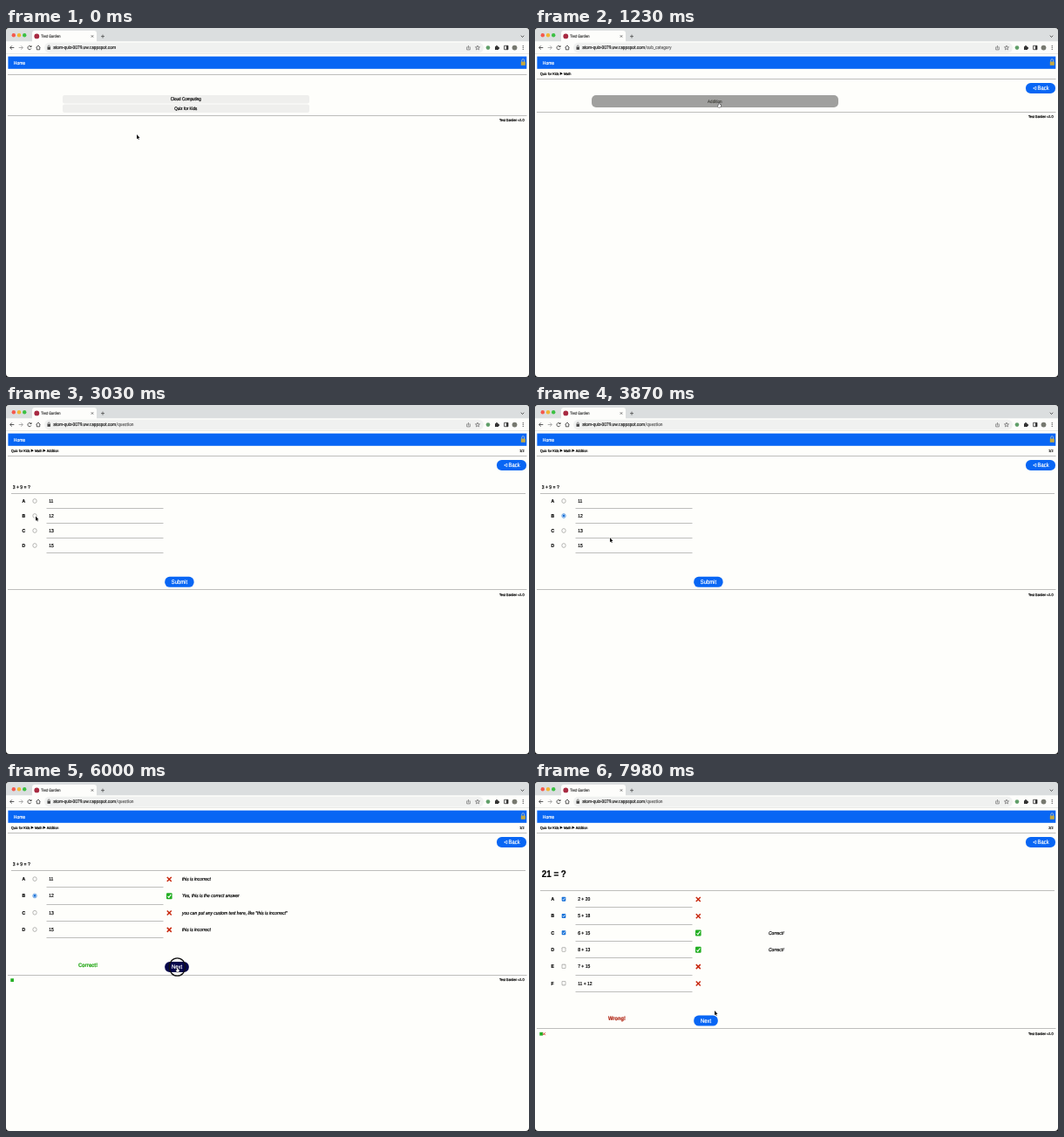
These frames come from a looping animation (600x400 px, 8 s). An HTML page with a canvas:

```html
<!DOCTYPE html>
<html lang="en">
<head>
<meta charset="utf-8">
<title>Quiz walkthrough</title>
<style>
html, body { margin: 0; width: 100%; height: 100%; overflow: hidden; background: #fefefb; }
canvas { display: block; width: 600px; height: 400px; }
</style>
</head>
<body>
<canvas id="stage" width="600" height="400"></canvas>
<script>
const ctx = document.getElementById('stage').getContext('2d');
const LOOP = 8000;
const ASPECT = 1.13;
const SANS = '"Liberation Sans", Arial, sans-serif';
const UI = 'Roboto, sans-serif';
const APP = 'Test Garden';
const PAPER = '#fefefb', BLUE = '#0866f4', PRESSED = '#06064c', RULE = '#bebebc';
const RED = '#c92a10', GREEN = '#22ae22', INK = '#000';

const PAGES = [
  [0, 'home'], [520, 'category'], [950, 'subcategory'], [1480, 'group'],
  [2300, 'first'], [4900, 'firstResult'], [6120, 'second'], [7800, 'secondResult']
];
const PATHS = { home: '', category: '/main_category', subcategory: '/sub_category', group: '/group' };

// time, x, y of the pointer tip
const TRACK = [
  [60, 150, 122], [340, 206, 92], [520, 206, 92], [660, 213, 86], [1000, 213, 86],
  [1200, 211, 85], [1520, 211, 85], [1900, 228, 113.5], [2350, 228, 113.5],
  [2950, 34, 127.5], [3500, 34, 127.5], [4450, 187.5, 200], [5000, 187.5, 200],
  [5600, 196.5, 212], [6140, 196.5, 212], [6440, 33, 133], [6570, 33, 133],
  [6690, 33, 150], [6810, 33, 150], [6930, 33, 167], [7070, 33, 167], [7550, 206, 262]
];
const CLICKS = [
  [390, 490], [800, 910], [1310, 1420], [2110, 2220], [3250, 3350], [4690, 4830],
  [5930, 6070], [6470, 6560], [6710, 6800], [6960, 7050], [7640, 7750]
];

const FIRST = {
  title: '3 + 9 = ?', size: 5.05, titleY: 94, top: 101.5, count: '1/2',
  options: ['11', '12', '13', '15'], right: [1],
  notes: ['this is incorrect', 'Yes, this is the correct answer',
    'you can put any custom text here, like "this is incorrect"', 'this is incorrect'],
  noteX: 202, picks: [[3340, 1]], verdict: 'Correct!'
};
const SECOND = {
  title: '21 = ?', size: 9.8, bold: true, titleY: 105, top: 124.5, count: '2/2', multi: true,
  options: ['2 + 20', '5 + 18', '6 + 15', '8 + 13', '7 + 15', '11 + 12'], right: [2, 3],
  notes: ['', '', 'Correct!', 'Correct!'],
  noteX: 268, picks: [[6550, 0], [6790, 1], [7040, 2]], verdict: 'Wrong!'
};

function text(s, x, y, size, { color = INK, style = '', align = 'left', font = SANS } = {}) {
  ctx.save();
  ctx.translate(x, y + size * 0.39);
  ctx.scale(1, ASPECT);
  ctx.font = `${style} ${size}px ${font}`;
  ctx.textRendering = 'geometricPrecision';
  ctx.textAlign = align;
  ctx.fillStyle = ctx.strokeStyle = color;
  ctx.lineWidth = 0.18; // tiny text needs a little extra weight
  ctx.fillText(s, 0, 0);
  ctx.strokeText(s, 0, 0);
  const width = ctx.measureText(s).width;
  ctx.restore();
  return width;
}

function rect(x, y, w, h, color) {
  ctx.fillStyle = color;
  ctx.fillRect(x, y, w, h);
}

function pill(x, y, w, h, r, color) {
  ctx.beginPath();
  ctx.roundRect(x, y, w, h, r);
  ctx.fillStyle = color;
  ctx.fill();
}

function disc(x, y, r, color) {
  ctx.beginPath();
  ctx.arc(x, y, r, 0, 7);
  ctx.fillStyle = color;
  ctx.fill();
}

function ring(x, y, rx, ry, color, width) {
  ctx.beginPath();
  ctx.ellipse(x, y, rx, ry, 0, 0, 7);
  ctx.strokeStyle = color;
  ctx.lineWidth = width;
  ctx.stroke();
}

function path(points, { x = 0, y = 0, fill, stroke, width = 0.8, close = false }) {
  ctx.beginPath();
  for (let i = 0; i < points.length; i += 2) ctx.lineTo(x + points[i], y + points[i + 1]);
  if (close) ctx.closePath();
  ctx.lineJoin = 'round';
  if (stroke) {
    ctx.strokeStyle = stroke;
    ctx.lineWidth = width;
    ctx.stroke();
  }
  if (fill) {
    ctx.fillStyle = fill;
    ctx.fill();
  }
}

function rule(y, x0 = 2, x1 = 597.5) {
  rect(x0, Math.floor(y), x1 - x0, 1, RULE);
}

function cross(x, y, r, width) {
  path([-r, -r, r, r], { x, y, stroke: RED, width });
  path([r, -r, -r, r], { x, y, stroke: RED, width });
}

function tick(x, y) {
  pill(x - 3.3, y - 3.5, 6.6, 7, 1, GREEN);
  path([-1.8, 0.2, -0.5, 1.7, 2, -1.9], { x, y, stroke: '#fff', width: 1.1 });
}

function button(label, x, y, w, pressed, labelX) {
  pill(x, y - 6, w, 12, 5.6, pressed ? PRESSED : BLUE);
  const centered = labelX === undefined;
  text(label, centered ? x + w / 2 : labelX, y, 5.9, { color: '#fff', align: centered ? 'center' : 'left' });
}

function browser(page) {
  rect(0, 0, 600, 400, PAPER);
  rect(0, 0, 600, 15.5, '#dbdedf');
  ['#f4594e', '#f2b632', '#3cc144'].forEach((c, i) => disc(8.8 + i * 6.2, 8.2, 2.2, c));
  pill(30, 3, 74, 14, [3, 3, 0, 0], '#fdfdfb');
  disc(35.3, 9.4, 2.9, '#a82a42');
  text(APP, 40.2, 9.5, 4.15, { font: UI, color: '#444' });
  path([-1.2, -1.2, 1.2, 1.2], { x: 99, y: 9.5, stroke: '#444', width: 0.7 });
  path([1.2, -1.2, -1.2, 1.2], { x: 99, y: 9.5, stroke: '#444', width: 0.7 });
  path([-2, 0, 2, 0], { x: 111, y: 9.6, stroke: '#444', width: 0.7 });
  path([0, -2, 0, 2], { x: 111, y: 9.6, stroke: '#444', width: 0.7 });
  path([-1.7, -0.8, 0, 1, 1.7, -0.8], { x: 592.5, y: 9.5, stroke: '#333' });

  rect(0, 15.5, 600, 14, '#fdfdfb');
  for (const [x, d, c] of [[7, -1, '#333'], [17, 1, '#999']]) {
    path([-2.3 * d, 0, 2.3 * d, 0], { x, y: 22.5, stroke: c });
    path([0.2 * d, -2.1, 2.3 * d, 0, 0.2 * d, 2.1], { x, y: 22.5, stroke: c });
  }
  ctx.beginPath();
  ctx.arc(27, 22.6, 2.1, 0.4, 5.5);
  ctx.strokeStyle = '#333';
  ctx.lineWidth = 0.8;
  ctx.stroke();
  path([0.2, 0, 2.4, 0, 2.4, -2.2], { x: 27, y: 21.9, fill: '#333' });
  path([-2.4, 0, 0, -2.4, 2.4, 0], { x: 37, y: 22.4, stroke: '#333' });
  path([-1.7, -0.2, -1.7, 2.4, 1.7, 2.4, 1.7, -0.2], { x: 37, y: 22.4, stroke: '#333' });

  pill(44, 16.8, 504, 11.6, 5.8, '#f0f1f0');
  rect(47.5, 21.8, 3.4, 3, '#444');
  ring(49.2, 21.4, 1.1, 1.5, '#444', 0.6);
  const host = text('atom-quiz-0079.uw.r.appspot.com', 54.2, 22.6, 4.75, { font: UI, color: '#222' });
  text(PATHS[page] ?? '/question', 54.2 + host, 22.6, 4.75, { font: UI, color: '#666' });

  path([-0.9, -0.8, -1.8, -0.8, -1.8, 2.3, 1.8, 2.3, 1.8, -0.8, 0.9, -0.8], { x: 530.5, y: 22.6, stroke: '#555', width: 0.6 });
  path([0, 1, 0, -2.6], { x: 530.5, y: 22.6, stroke: '#555', width: 0.6 });
  const star = [];
  for (let i = 0; i < 10; i++) {
    const r = i % 2 ? 1.1 : 2.7, a = i * Math.PI / 5 - Math.PI / 2;
    star.push(r * Math.cos(a), r * Math.sin(a));
  }
  path(star, { x: 541, y: 22.7, stroke: '#555', width: 0.6, close: true });
  disc(553, 22.6, 2.3, '#5f9e68');
  rect(561, 21.2, 4, 3.8, '#333');
  disc(563, 20.9, 1, '#333');
  disc(565.2, 23, 1, '#333');
  ctx.strokeStyle = '#333';
  ctx.lineWidth = 0.8;
  ctx.strokeRect(571.6, 20.3, 4.4, 4.4);
  rect(574, 20.3, 2, 4.4, '#333');
  disc(583.5, 22.6, 2.9, '#777970');
  for (let i = -1; i < 2; i++) disc(593.2, 22.6 + i * 1.9, 0.6, '#333');
  rect(0, 29, 600, 0.7, '#e0e1e0');
}

function corners() {
  const cut = (x, y, dx, dy, r) => {
    ctx.beginPath();
    ctx.moveTo(x, y);
    ctx.lineTo(x + dx * r, y);
    ctx.quadraticCurveTo(x, y, x, y + dy * r);
    ctx.fillStyle = '#111';
    ctx.fill();
  };
  cut(0, 0, 1, 1, 3);
  cut(600, 0, -1, 1, 3);
  cut(0, 400, 1, -1, 4);
  cut(600, 400, -1, -1, 4);
}

function header(crumbs, count) {
  rect(2.4, 32.6, 594.9, 14.2, BLUE);
  text('Home', 8.8, 39.8, 5, { color: '#fff' });
  ring(593.2, 37.8, 1.5, 2.2, '#c4c6c4', 0.8);
  rect(590.8, 38.6, 5, 4.2, '#c4a83f');
  if (!crumbs.length) return rule(53);
  let x = 6;
  crumbs.forEach((c, i) => {
    if (i) {
      path([0, -1.7, 3.2, 0, 0, 1.7], { x: x + 1.2, y: 52.2, fill: INK });
      x += 5.5;
    }
    x += text(c, x, 52.2, 3.75);
  });
  if (count) text(count, 594.5, 52.2, 3.75, { align: 'right' });
  rule(58);
  button('Back', 563, 69, 34, false, 576.6);
  path([3.2, -1.8, 0, 0, 3.2, 1.8], { x: 571.6, y: 69, stroke: '#fff', width: 0.7, close: true });
}

function footer(y) {
  rule(y);
  text(APP + ' v1.0', 594.5, y + 6, 3.75, { align: 'right' });
}

function choices(labels, pointer, pressed) {
  let y = 77;
  for (const label of labels) {
    const over = pointer.x > 65 && pointer.x < 348 && pointer.y >= y && pointer.y < y + 14;
    const h = over ? 14 : 9.6;
    pill(65, y, 283, h, over ? 5 : 2, over ? (pressed ? '#777774' : '#a0a09e') : '#efefed');
    text(label, 206.3, y + h / 2 - 0.2, 4.55, { align: 'center', color: over ? '#4a4a44' : INK });
    y += h + 0.9;
  }
  footer(labels.length > 1 ? y + 2 : 96);
}

function group(pressed) {
  [['Category:', 'Quiz for Kids'], ['Subcategory:', 'Math'],
   ['Question group:', 'Addition'], ['Questions:', '2']].forEach(([label, value], i) => {
    const y = 80 + i * 8.15;
    text(label, 183.2, y, 5, { style: 'bold' });
    text(value, 223.5, y, 5.05);
  });
  button('Start', 223.3, 115.2, 38, pressed, 232.8);
  path([0, -2.3, 4.6, 0, 0, 2.3], { x: 247, y: 115.2, fill: '#fff' });
  footer(130.7);
}

function box(x, y, multi, on) {
  if (multi) {
    pill(x - 2.3, y - 2.5, 4.6, 5, 0.8, on ? '#1670d8' : '#8c8c8a');
    if (on) path([-1.2, 0, -0.3, 1.1, 1.4, -1.3], { x, y, stroke: '#fff', width: 0.8 });
    else rect(x - 1.7, y - 1.9, 3.4, 3.8, PAPER);
    return;
  }
  ring(x, y, 2.2, 2.4, on ? '#1670d8' : '#8c8c8a', 0.6);
  if (on) disc(x, y, 1.4, '#1670d8');
}

function question(q, done, t, pressed) {
  const step = done ? 19.3 : 17;
  const chosen = q.picks.filter(p => t >= p[0]).map(p => p[1]);
  text(q.title, 7.8, q.titleY, q.size, { style: q.bold ? 'bold' : '' });
  rule(q.top, 6, 596);
  q.options.forEach((option, i) => {
    const y = q.top + step * (i + 0.5);
    text('ABCDEF'[i], 18.6, y, 5, { style: 'bold' });
    box(33, y, q.multi, chosen.includes(i));
    text(option, 49.2, y, 5);
    rule(q.top + step * (i + 1), 46.5, 180.5);
    if (!done) return;
    if (q.right.includes(i)) tick(187.3, y + 0.3);
    else cross(187.3, y + 0.3, 2.5, 1.5);
    if (q.notes[i]) text(q.notes[i], q.noteX, y, 4.95, { style: 'italic' });
  });
  const y = q.top + step * q.options.length + 33.3;
  if (done) {
    const good = q.verdict === 'Correct!';
    text(q.verdict, 94, y - 2.4, 5.7, { style: 'bold', align: 'center', color: good ? '#25a818' : '#b02412' });
    button('Next', 182.2, y, 27.6, pressed);
  } else {
    button('Submit', 182.2, y, 33.4, pressed);
  }
  footer(y + 9);
  if (done || q === SECOND) rect(5.3, y + 13.2, 3.6, 3.8, GREEN);
  if (done && q === SECOND) cross(10.4, y + 15.1, 1.4, 0.9);
}

function pointerAt(t) {
  let prev = TRACK[0];
  for (const key of TRACK) {
    if (t < key[0]) {
      const u = Math.max(0, (t - prev[0]) / (key[0] - prev[0] || 1));
      const e = u * u * (3 - 2 * u);
      return { x: prev[1] + (key[1] - prev[1]) * e, y: prev[2] + (key[2] - prev[2]) * e };
    }
    prev = key;
  }
  return { x: prev[1], y: prev[2] };
}

function drawPointer({ x, y }, hand, pressed) {
  if (hand) {
    path([-0.4, 0, 0.4, 0, 0.6, 1.9, 2.3, 2.4, 2.3, 4, 1.7, 5.3, -0.6, 5.3, -1.8, 3.5, -1.4, 3, -0.5, 3.4],
      { x, y: y + 0.5, fill: '#fff', stroke: '#111', width: 0.9, close: true });
  } else {
    path([0, 0, 0, 5.2, 1.2, 4.2, 2, 6, 2.8, 5.6, 2, 3.9, 3.5, 3.8],
      { x, y, fill: '#111', stroke: '#fff', width: 0.9, close: true });
  }
  if (pressed) ring(x, y, 9.3, 10.2, '#111', 1.3);
}

function draw(t) {
  const page = PAGES.filter(p => t >= p[0]).pop()[1];
  const pointer = pointerAt(t);
  const pressed = CLICKS.some(([a, b]) => t >= a && t < b);
  const inside = (x0, x1, y0, y1) =>
    pointer.x > x0 && pointer.x < x1 && pointer.y >= y0 && pointer.y < y1;
  const crumbs = ['Quiz for Kids', 'Math', 'Addition'];
  let hand = false;
  browser(page);
  if (page === 'home') {
    header([]);
    choices(['Cloud Computing', 'Quiz for Kids'], pointer, pressed);
    hand = inside(65, 348, 77, 101);
  } else if (page === 'category' || page === 'subcategory') {
    const deep = page === 'subcategory';
    header(crumbs.slice(0, deep ? 2 : 1));
    choices([deep ? 'Addition' : 'Math'], pointer, pressed);
    hand = inside(65, 348, 77, 91);
  } else if (page === 'group') {
    header(crumbs);
    hand = inside(223, 261, 109, 121);
    group(pressed && hand);
  } else {
    const q = page.startsWith('first') ? FIRST : SECOND;
    const done = page.endsWith('Result');
    const y = q.top + (done ? 19.3 : 17) * q.options.length + 33.3;
    header(crumbs, q.count);
    hand = inside(182, done ? 210 : 215, y - 6, y + 6);
    question(q, done, t, pressed && hand);
  }
  drawPointer(pointer, hand, pressed);
  corners();
}

const start = performance.now();
function animate() {
  draw((performance.now() - start) % LOOP);
  requestAnimationFrame(animate);
}
animate();
</script>
</body>
</html>
```
